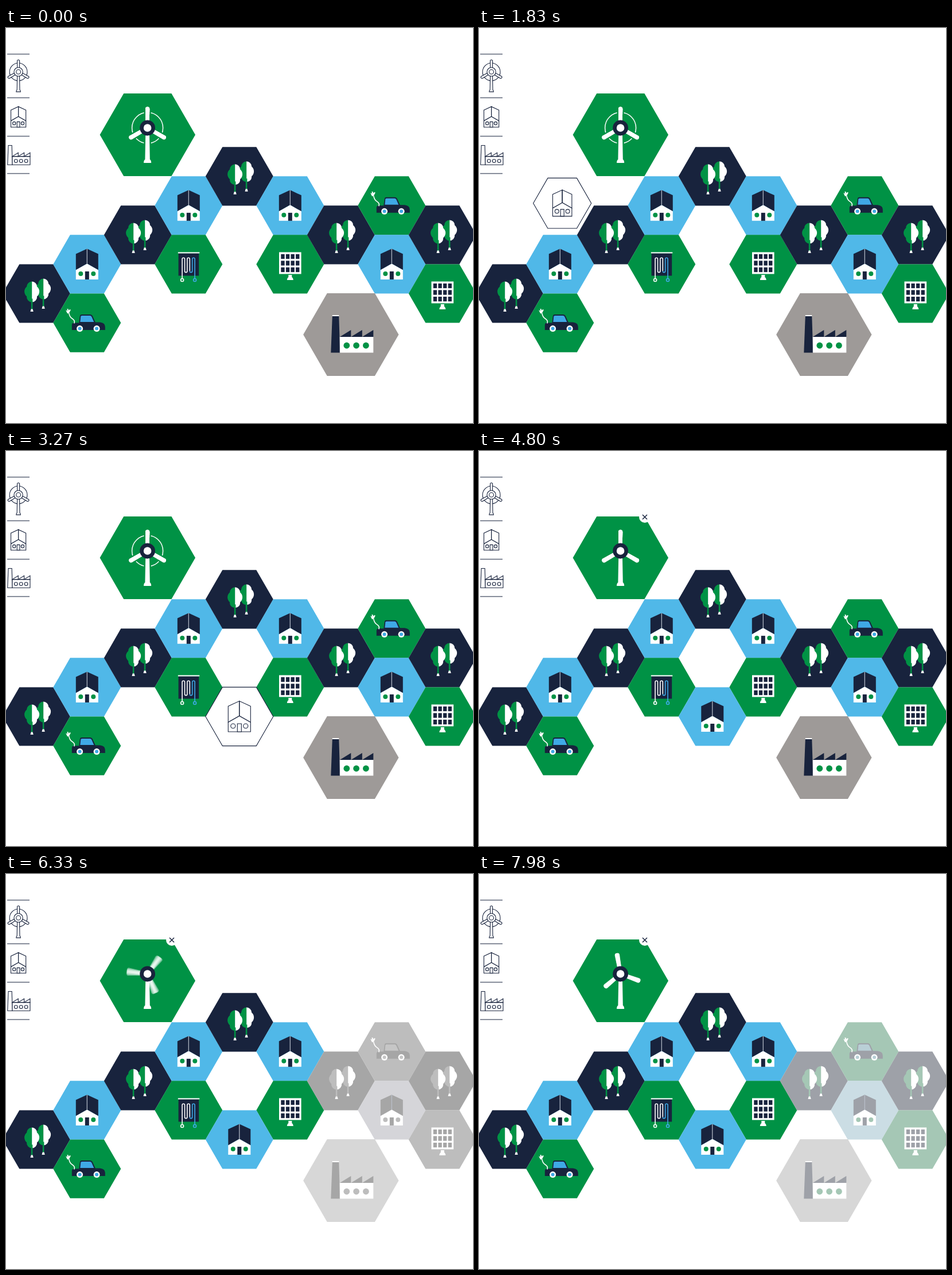
An HTML page that plays this animation: 814 px wide and 688 px high, repeating every 8 s.

```html
<!DOCTYPE html>
<html lang="en">
<head>
<meta charset="utf-8">
<title>Energy hexagons</title>
<style>
html, body { margin: 0; width: 100%; height: 100%; overflow: hidden; background: #fff; }
svg {
  display: block; width: 814px; height: 688px;
  --g: rgb(0,146,69); --n: rgb(24,35,61); --b: rgb(80,184,232); --s: rgb(63,169,230); --k: rgb(158,154,152);
}
.g { fill: var(--g); }
.n { fill: var(--n); }
.b { fill: var(--b); }
.s { fill: var(--s); }
.k { fill: var(--k); }
.w { fill: #fff; }
.gap { stroke: var(--g); stroke-width: 5; }
.ring { fill: none; stroke: #fff; stroke-width: 1.5; }
.split { stroke: #b9bfca; stroke-width: 1.2; }
.pipe { fill: none; stroke: #fff; stroke-width: 1.6; }
.pipe.cold { stroke: var(--s); }
.line * { fill: #fff; stroke: #18233d; stroke-width: 1.1; vector-effect: non-scaling-stroke; }
.line .ring { fill: none; }
.line .gap, .line .cap { display: none; }
.rule { stroke: #5d6577; stroke-width: 1.5; }
</style>
</head>
<body>
<svg id="stage" viewBox="0 0 814 688"></svg>
<script>
const LOOP = 8000;
const SMALL = 59, BIG = 83.2;
const col = i => 52.8 + 88.5 * i;
const row = j => 258.3 + 51.05 * j;

const at = (x, y, body, attrs = "") => `<g transform="translate(${x} ${y})" ${attrs}>${body}</g>`;
const path = (cls, d) => `<path class="${cls}" d="${d}"/>`;
const dot = (cls, x, y, r) => `<circle class="${cls}" cx="${x}" cy="${y}" r="${r}"/>`;
const rect = (cls, x, y, w, h) => `<rect class="${cls}" x="${x}" y="${y}" width="${w}" height="${h}"/>`;
const repeat = (n, make) => Array.from({ length: n }, (_, i) => make(i)).join("");

function hex(cls, r) {
  const h = r * Math.sqrt(3) / 2;
  return path(cls, `M${-r} 0L${-r / 2} ${-h}H${r / 2}L${r} 0L${r / 2} ${h}H${-r / 2}Z`);
}

function house() {
  return path("n", "M-19.5-18L0-27V-1L-19.5 10Z") +
    path("n", "M19.5-18L0-27V-1L19.5 10Z") +
    path("split", "M0-27V-1") +
    path("w", "M-19.5 10L0-1L19.5 10V26.5H-19.5Z") +
    rect("n", -3.5, 12.5, 7, 14) +
    dot("g", -11, 16.5, 4) + dot("g", 11, 16.5, 4);
}

function tree() {
  const half = "M0-18a9 9 0 0 1 9 9a11 11 0 0 1 0 17a9 9 0 0 1-9 10z";
  return path("w", half) +
    `<g transform="scale(-1 1)">${path("g", half)}</g>` +
    rect("g", -1.3, 12, 2.6, 19) +
    path("w", "M-1.4 30h2.8l1.2 4.5h-5.2z");
}

const trees = () => at(12.3, -8, tree()) + at(-7.7, -3, tree());

function car() {
  const wheel = x => dot("w", x, 10, 5.5) + dot("s", x, 10, 3);
  return path("n", "M-26.5 12.5v-8.5q0-4 4-4h8.5l1.5-11.5q.3-3 3-3h15.5q2 0 3.5 2.5l5 11h8q9 1 9 8v5.5z") +
    path("s", "M-12-1.5l1-9.5q.2-1.5 2-1.5h14q2 0 3 2l4 9z") +
    wheel(-12.7) + wheel(16.8) +
    path("pipe", "M-22.5 1q2-5-3-8t-6-10") +
    path("w", "M-37-22l3 1-1-3 2-.5 1 3 2-2 1.5 1-2 4q-1 3-4 2z");
}

function solar() {
  return rect("w", -19.3, -21, 38.6, 38) +
    repeat(12, i => rect("n", -16 + 8.6 * (i % 4), -17.5 + 11.5 * Math.floor(i / 4), 6.3, 8.2)) +
    path("w", "M-3 18.5h6v4q2 1 2.5 5h-11q.5-4 2.5-5z");
}

function heater() {
  return rect("n", -17.7, -19, 35.6, 39) +
    rect("w", -18.5, -21, 37.5, 2) +
    path("pipe", "M-11.2 25V-9a2.2 2.2 0 0 1 4.4 0V12a2.2 2.2 0 0 0 4.4 0V-9a2.2 2.2 0 0 1 4.4 0V12") +
    path("pipe cold", "M2 12a2.2 2.2 0 0 0 4.4 0V-9a2.2 2.2 0 0 1 4.4 0V25") +
    dot("pipe", -11.2, 27.6, 2.5) +
    dot("pipe cold", 10.8, 27.6, 2.5);
}

function factory() {
  return path("n", "M-32.5-32h11.5l2 63.5h-16z") +
    rect("w cap", -32.5, -34, 11.5, 2) +
    rect("w", -19.5, 4, 58.5, 27.5) +
    repeat(3, i => path("n", `M${-19.5 + 19.5 * i} 4l19.5-12v12z`)) +
    repeat(3, i => dot("g", -7.5 + 16.8 * i, 19, 5.4));
}

const BLADE = "M-3.2-10L-3.6-33a3.6 3.6 0 0 1 7.2 0L3.2-10Z";
const TOWER = "M-3.4 12h6.8l.8 43q2.2 1 2.4 6h-13.2q.2-5 2.4-6z";
const rotor = cls => repeat(3, i => `<g transform="rotate(${120 * i})">${path(cls, BLADE)}</g>`);
const hub = () => dot("n", 0, 0, 13.4) + dot("w", 0, 0, 6.8);

function ringAndGaps() {
  return dot("ring", 0, 0, 27) + path("gap", TOWER) + rotor("gap");
}

const GHOSTS = 5;
const turbine = () =>
  `<g id="ring">${ringAndGaps()}</g>` + path("w", TOWER) +
  repeat(GHOSTS, () => `<g class="ghost">${rotor("w")}</g>`) + hub();

const outlineTurbine = () => ringAndGaps() + path("w", TOWER) + rotor("w") + hub();

const cell = (i, j, color, icon) => at(col(i), row(j), hex(color, SMALL) + icon());
const icon = (x, y, scale, body) => at(x, y, `<g class="line" transform="scale(${scale})">${body}</g>`);

document.getElementById("stage").innerHTML =
  [45.5, 121.5, 188.5, 253.5].map(y => path("rule", `M2 ${y}H41`)).join("") +
  icon(21.6, 76.4, .57, outlineTurbine()) +
  icon(21.6, 155, .67, house()) +
  icon(21.3, 221.5, .53, factory()) +
  cell(0, 4, "n", trees) +
  cell(1, 3, "b", house) +
  cell(1, 5, "g", car) +
  cell(2, 2, "n", trees) +
  cell(3, 1, "b", house) +
  cell(3, 3, "g", heater) +
  cell(4, 0, "n", trees) +
  cell(5, 1, "b", house) +
  cell(5, 3, "g", solar) +
  `<g id="far">` +
  cell(6, 2, "n", trees) +
  cell(7, 1, "g", car) +
  cell(7, 3, "b", house) +
  cell(8, 2, "n", trees) +
  cell(8, 4, "g", solar) +
  at(601.3, 534, hex("k", BIG) + factory()) +
  `</g>` +
  at(246.8, 186, hex("g", BIG)) +
  at(246.6, 174, turbine()) +
  at(289, 115, dot("w", 0, 0, 10) +
    `<path d="M-4-4L4 4M4-4L-4 4" stroke="#18233d" stroke-width="1.5"/>`, `id="close"`) +
  `<g id="drag" class="line">${hex("", SMALL)}${house()}</g>` +
  `<g id="placed">${cell(4, 4, "b", house)}</g>`;

const [ring, far, closeBtn, drag, placed] =
  ["ring", "far", "close", "drag", "placed"].map(id => document.getElementById(id));
const ghosts = document.querySelectorAll(".ghost");

const clamp = v => Math.min(1, Math.max(0, v));
const span = (t, a, b) => clamp((t - a) / (b - a));
const lerp = (a, b, p) => a + (b - a) * p;
const show = (el, on) => el.style.display = on ? "" : "none";

// Piecewise curve through [time, value] keys; smooth uses Hermite slopes that rest at both ends.
function track(keys, t, smooth) {
  const last = keys.length - 1;
  if (t <= keys[0][0]) return keys[0][1];
  if (t >= keys[last][0]) return keys[last][1];
  const i = keys.findIndex(k => k[0] > t) - 1;
  const [t0, v0] = keys[i], [t1, v1] = keys[i + 1];
  const d = t1 - t0, p = (t - t0) / d;
  if (!smooth) return lerp(v0, v1, p);
  const slope = j => j === 0 || j === last ? 0 :
    (keys[j + 1][1] - keys[j - 1][1]) / (keys[j + 1][0] - keys[j - 1][0]);
  const q = p * p, c = q * p;
  return v0 * (2 * c - 3 * q + 1) + v1 * (3 * q - 2 * c) +
    d * (slope(i) * (c - 2 * q + p) + slope(i + 1) * (c - q));
}

const dragX = [[930, 22], [1710, 126], [1830, 145], [2520, 261.5], [3270, col(4)]];
const dragY = [[930, 155], [1710, 279], [1830, 305], [2520, 433.5], [3270, row(4)]];
const dragR = [[930, 39.5], [1670, 39.5], [1710, 42], [1830, 50.5], [1920, 55],
  [2000, 55], [2160, 39.5], [3000, 39.5], [3270, SMALL]];
const spin = [[4800, 0], [5580, 131], [7050, 635], [7980, 710], [8160, 720]];

// Each colour: full, greyed, partly tinted again.
const shades = {
  g: [[0, 146, 69], [189, 189, 189], [165, 199, 181]],
  n: [[24, 35, 61], [166, 166, 166], [158, 161, 168]],
  b: [[80, 184, 232], [213, 213, 217], [203, 221, 228]],
  s: [[63, 169, 230], [198, 198, 198], [185, 207, 214]],
  k: [[158, 154, 152], [215, 215, 215], [215, 215, 215]]
};

function tintFar(t) {
  const dim = span(t, 4800, 5400), back = span(t, 7850, 7980);
  for (const name in shades) {
    const [full, grey, tint] = shades[name];
    const rgb = full.map((v, i) => Math.round(lerp(lerp(v, grey[i], dim), tint[i], back)));
    far.style.setProperty("--" + name, `rgb(${rgb})`);
  }
}

function turnRotor(t) {
  const angle = track(spin, t, true);
  const blur = Math.abs(track(spin, t + 15, true) - track(spin, t - 15, true));
  ghosts.forEach((el, i) => {
    const offset = blur * (i / (GHOSTS - 1) - .5);
    el.setAttribute("transform", `rotate(${angle + offset})`);
    el.setAttribute("opacity", Math.max(.4, 1 - blur / 8));
  });
}

function draw(t) {
  show(drag, t >= 930 && t < 3690);
  drag.setAttribute("transform",
    `translate(${track(dragX, t, true)} ${track(dragY, t, true)}) scale(${track(dragR, t) / SMALL})`);
  placed.setAttribute("opacity", span(t, 3450, 3690));
  show(ring, t < 4800);
  show(closeBtn, t >= 4800);
  tintFar(t);
  turnRotor(t);
}

const start = performance.now();
function tick() {
  draw((performance.now() - start) % LOOP);
  requestAnimationFrame(tick);
}
tick();
</script>
</body>
</html>
```
